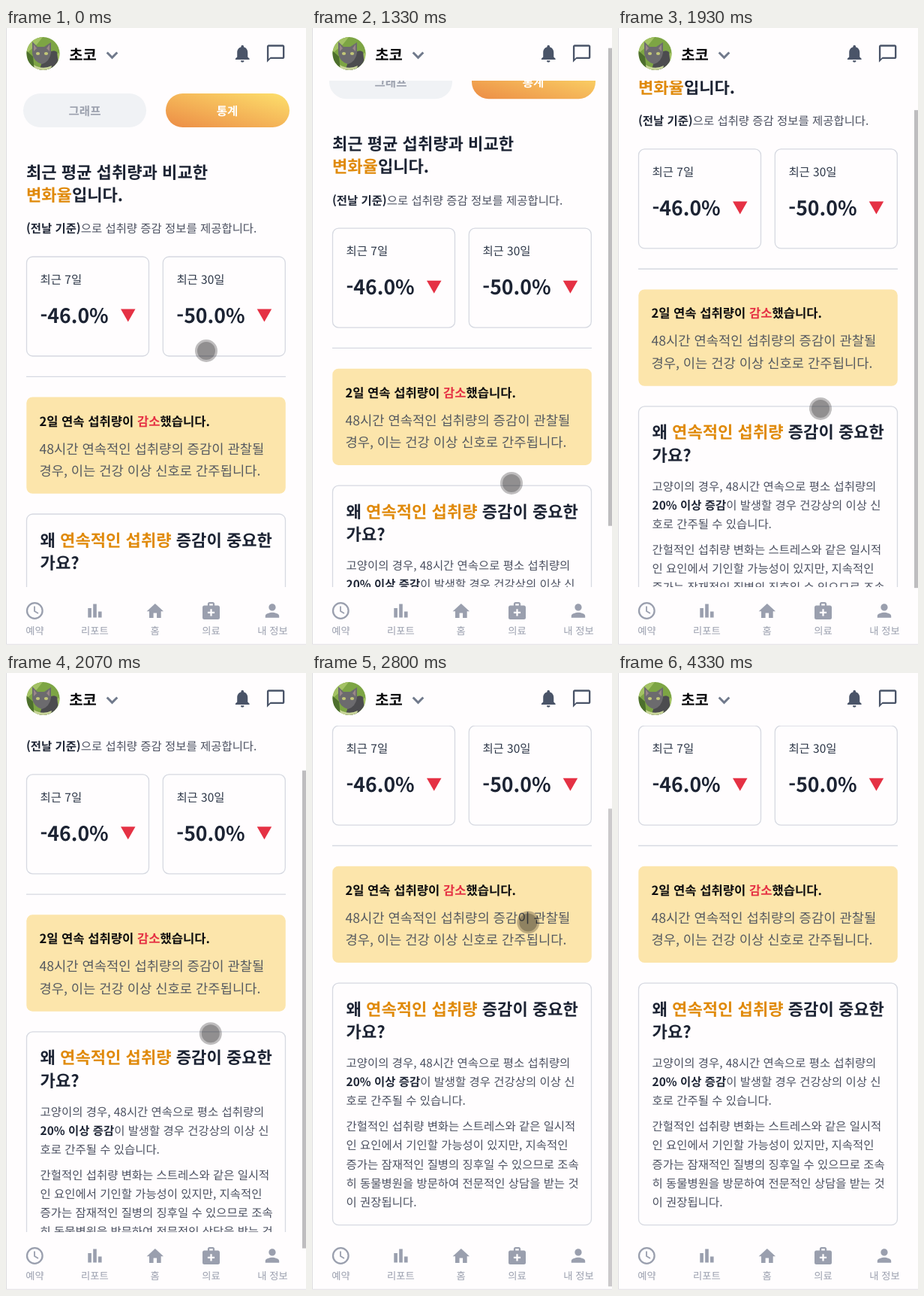
Recreate the animation shown at these times as an HTML page. Size 400x820 px, loop 4470 ms.

```html
<!DOCTYPE html>
<html lang="ko">
<head>
<meta charset="utf-8">
<style>
html, body { margin: 0; width: 100%; height: 100%; overflow: hidden; background: #fffdfe; }
svg { display: block; font-family: "Noto Sans CJK KR", "Noto Sans CJK", "Noto Sans", sans-serif; text-rendering: geometricPrecision; }
.b { font-weight: 700; }
.h { font-size: 22.1px; font-weight: 700; fill: #1c2333; }
.p { font-size: 15.45px; fill: #4b5060; }
.p .b { fill: #1f2636; }
.l { font-size: 15.45px; font-weight: 500; fill: #2d3748; }
.n { font-size: 26.6px; font-weight: 700; fill: #1c2333; }
.y { font-size: 17.7px; fill: #565a60; }
.o { fill: #e08a0b; }
.r { fill: #e53144; }
.box { fill: none; stroke: #d6d9e1; stroke-width: 1.3; }
.nav { fill: #9a9fae; font-size: 13.3px; text-anchor: middle; }
.tab { font-size: 15.5px; font-weight: 700; text-anchor: middle; }
</style>
</head>
<body>
<svg width="400" height="820" viewBox="0 0 400 820">
  <defs>
    <linearGradient id="sun" x1="0" y1="1" x2="1" y2="0">
      <stop offset="0" stop-color="#ec8c45"/><stop offset="1" stop-color="#fde06c"/>
    </linearGradient>
    <clipPath id="view"><rect y="70" width="400" height="673"/></clipPath>
    <clipPath id="round"><circle cx="49.5" cy="34" r="22"/></clipPath>
  </defs>
  <rect width="400" height="820" fill="#fffdfe"/>

  <g clip-path="url(#view)"><g id="page">
    <rect x="23" y="87" width="164" height="45" rx="22.5" fill="#f0f2f5"/>
    <rect x="213" y="87" width="165" height="45" rx="22.5" fill="url(#sun)"/>
    <text class="tab" x="105" y="115.7" fill="#9ca1ae">그래프</text>
    <text class="tab" x="295" y="115.7" fill="#fff">통계</text>

    <text class="h" x="26.9" y="199.5">최근 평균 섭취량과 비교한</text>
    <text class="h" x="26.9" y="230.3"><tspan class="o">변화율</tspan>입니다.</text>
    <text class="p" x="26.9" y="272.4"><tspan class="b">(전날 기준)</tspan>으로 섭취량 증감 정보를 제공합니다.</text>

    <rect class="box" x="27.5" y="304" width="163" height="132" rx="8"/>
    <text class="l" x="45.6" y="340">최근 7일</text>
    <text class="n" x="45.5" y="392">-46.0%</text>
    <path class="r" d="M153 373.5h19.5l-9.75 17z"/>
    <rect class="box" x="209.3" y="304" width="163" height="132" rx="8"/>
    <text class="l" x="227.4" y="340">최근 30일</text>
    <text class="n" x="227.3" y="392">-50.0%</text>
    <path class="r" d="M334.7 373.5h19.5l-9.75 17z"/>
    <path class="box" d="M27 463.3H373"/>

    <rect x="27.3" y="490.5" width="345.5" height="128.3" rx="8" fill="#fce5ab"/>
    <text x="44.4" y="528.5" class="b" font-size="16.6" fill="#0c0c0e">2일 연속 섭취량이 <tspan class="r">감소</tspan>했습니다.</text>
    <text class="y" x="44.4" y="565.5">48시간 연속적인 섭취량의 증감이 관찰될</text>
    <text class="y" x="44.4" y="595">경우, 이는 건강 이상 신호로 간주됩니다.</text>

    <rect class="box" x="27.5" y="646" width="345" height="321.5" rx="8"/>
    <text class="h" x="45.6" y="688.5">왜 <tspan class="o">연속적인 섭취량</tspan> 증감이 중요한</text>
    <text class="h" x="45.6" y="719.3">가요?</text>
    <g class="p">
      <text x="45.6" y="757.7">고양이의 경우, 48시간 연속으로 평소 섭취량의</text>
      <text x="45.6" y="783"><tspan class="b">20% 이상 증감</tspan>이 발생할 경우 건강상의 이상 신</text>
      <text x="45.6" y="808">호로 간주될 수 있습니다.</text>
      <text x="45.6" y="842.3">간헐적인 섭취량 변화는 스트레스와 같은 일시적</text>
      <text x="45.6" y="867.3">인 요인에서 기인할 가능성이 있지만, 지속적인</text>
      <text x="45.6" y="892.4">증가는 잠재적인 질병의 징후일 수 있으므로 조속</text>
      <text x="45.6" y="917.5">히 동물병원을 방문하여 전문적인 상담을 받는 것</text>
      <text x="45.6" y="942.6">이 권장됩니다.</text>
    </g>
  </g></g>

  <!-- header -->
  <g clip-path="url(#round)">
    <rect x="27" y="12" width="45" height="45" fill="#7da544"/>
    <path d="M27 12h22l-8 10-14 12zM60 40l12-8v24H58z" fill="#a3c264"/>
    <path d="M27 30l9 8 2 19H27z" fill="#4d6f2d"/>
    <path d="M50 40q12-14 18-8l2 16-8 9H44z" fill="#4c4c4f"/>
    <path d="M35 18l7 7h9l9-6 0 14q-2 12-12 15-11-3-13-14z" fill="#6c6b6e"/>
    <path d="M37 22l4 5-4 4zM58 22l-4 5 4 4z" fill="#9a8688"/>
    <ellipse cx="42.5" cy="34" rx="2.6" ry="2" fill="#c3c878"/>
    <ellipse cx="53.5" cy="34" rx="2.6" ry="2" fill="#c3c878"/>
    <path d="M37 49q12 7 24 1l-2 7H39z" fill="#c9d59a"/>
  </g>
  <text x="84.3" y="42.8" class="b" font-size="19.9" fill="#08080a">초코</text>
  <path d="M134.7 32.5l6.8 6.8 6.8-6.8" fill="none" stroke="#717a8c" stroke-width="3"/>
  <g fill="#4a5468">
    <path transform="translate(301.2 19.8) scale(1.17)" d="M12 22c1.1 0 2-.9 2-2h-4c0 1.1.89 2 2 2zm6-6v-5c0-3.07-1.64-5.64-4.5-6.32V4c0-.83-.67-1.5-1.5-1.5s-1.5.67-1.5 1.5v.68C7.63 5.36 6 7.92 6 11v5l-2 2v1h16v-1l-2-2z"/>
    <path transform="translate(345.6 20) scale(1.17)" d="M20 2H4c-1.1 0-2 .9-2 2v18l4-4h14c1.1 0 2-.9 2-2V4c0-1.1-.9-2-2-2zm0 14H6l-2 2V4h16v12z"/>
  </g>

  <!-- bottom bar -->
  <g class="nav">
    <circle cx="38.3" cy="774.5" r="10.3" fill="none" stroke="#9a9fae" stroke-width="2.3"/>
    <path d="M38 768.5v6.5l5 3" fill="none" stroke="#9a9fae" stroke-width="1.8"/>
    <path d="M109.3 771h4.6v12.5h-4.6zM116.2 765.5h4.6v18h-4.6zM123 775.5h4.6v8H123z"/>
    <path transform="translate(185.4 761.7) scale(1.12)" d="M10 20v-6h4v6h5v-8h3L12 3 2 12h3v8z"/>
    <path transform="translate(259.7 760.7) scale(1.15)" d="M20 6h-4V4c0-1.1-.9-2-2-2h-4c-1.1 0-2 .9-2 2v2H4c-1.1 0-2 .9-2 2v12c0 1.1.9 2 2 2h16c1.1 0 2-.9 2-2V8c0-1.1-.9-2-2-2zM10 4h4v2h-4V4zm6 11h-3v3h-2v-3H8v-2h3v-3h2v3h3v2z"/>
    <path transform="translate(341.2 760.7) scale(1.15)" d="M12 12c2.21 0 4-1.79 4-4s-1.79-4-4-4-4 1.79-4 4 1.79 4 4 4zm0 2c-2.67 0-8 1.34-8 4v2h16v-2c0-2.66-5.33-4-8-4z"/>
    <text x="38.4" y="806">예약</text>
    <text x="118.3" y="806">리포트</text>
    <text x="198.5" y="806">홈</text>
    <text x="273.5" y="806">의료</text>
    <text x="355.5" y="806">내 정보</text>
  </g>

  <path d="M.5 0V819.2H400" fill="none" stroke="#dedde0"/>
  <rect id="bar" x="395" width="5" height="635" fill="#bebdbf"/>
  <g id="dot"><circle r="15" fill-opacity=".25"/><circle r="12" fill-opacity=".24"/></g>
</svg>
<script>
const LOOP = 4470, STEP = 200 / 3;
const $ = id => document.getElementById(id);
const page = $('page'), bar = $('bar'), dot = $('dot');

// keys: [time, value] pairs, linear in between
function track(t, keys) {
  const i = keys.findIndex(k => k[0] > t);
  if (i === 0) return keys[0][1];
  if (i < 0) return keys[keys.length - 1][1];
  const [t0, a] = keys[i - 1], [t1, b] = keys[i];
  return a + (b - a) * (t - t0) / (t1 - t0);
}

const SCROLL = [[1067, 0], [1133, 5], [1333, 37.8], [1667, 100], [1933, 143], [2267, 208.3], [2400, 233.8]];
const DRAG_X = [[1667, 266], [1933, 270], [2267, 277], [2800, 288.3]];
const DRAG_Y = [[1067, 644], [1133, 639], [1333, 605], [1667, 545], [1933, 506], [2267, 439], [2800, 331.5], [2867, 325]];
const BAR_ALPHA = [[1067, 0], [1200, 1], [2733, 1], [3067, 0]];
const DOT_ALPHA = [[3200, 1], [3467, 0]];

function draw(now) {
  const t = Math.floor((now % LOOP + 5) / STEP) * STEP;
  const s = track(t, SCROLL);
  const u = Math.min(t / 933, 1), ease = u * u * (3 - 2 * u);
  const x = t < 1000 ? 267 - ease : track(t, DRAG_X);
  const y = t < 1000 ? 429 + 215 * ease : track(t, DRAG_Y);
  page.setAttribute('transform', `translate(0 ${-s})`);
  bar.setAttribute('y', Math.max(0, s * .784 - 3));
  bar.setAttribute('opacity', track(t, BAR_ALPHA));
  dot.setAttribute('transform', `translate(${x} ${y})`);
  dot.setAttribute('opacity', track(t, DOT_ALPHA));
}

let start;
function tick(now) {
  start ??= now;
  draw(now - start);
  requestAnimationFrame(tick);
}
draw(0);
requestAnimationFrame(tick);
</script>
</body>
</html>
```
